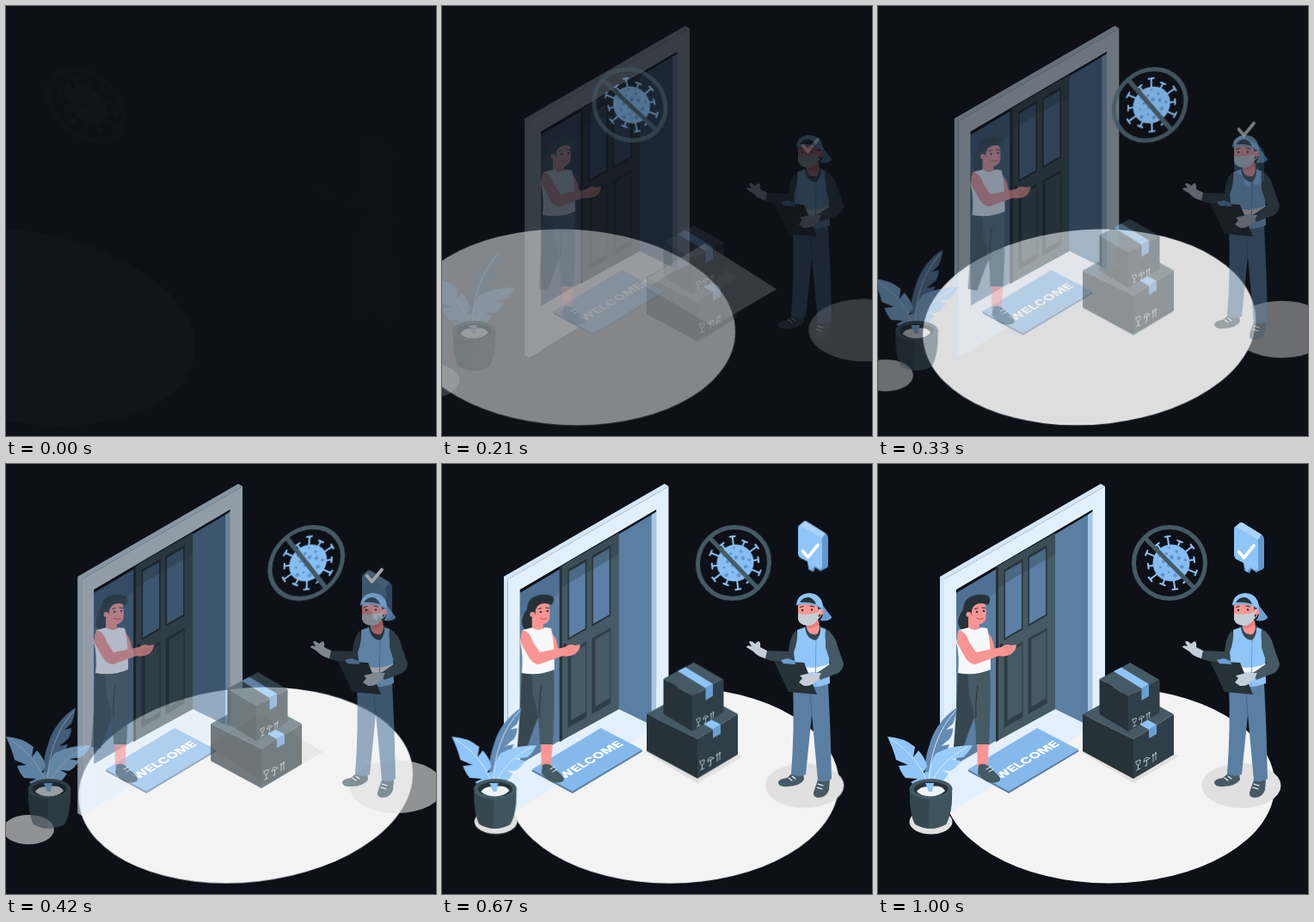
Recreate the animation shown at these times as an HTML page. Size 500 by 500 pixels, loop 1.04 s.

```html
<!DOCTYPE html>
<html lang="en">
<head>
<meta charset="utf-8">
<title>Contactless delivery</title>
<style>
  html, body { margin: 0; width: 100%; height: 100%; overflow: hidden; background: #0d1117; }
  svg { display: block; width: 100%; height: 100%; }
  .move { animation: 1s cubic-bezier(.36, -.01, .5, 1.38) both paused; }
  .sweep { animation-name: sweep; transform-box: fill-box; transform-origin: center; }
  .slide { animation-name: slide; }
  .shrink { animation-name: shrink; transform-origin: 252px 367px; }
  .fade { animation-name: fade; }
  @keyframes sweep {
    0% { transform: translateX(-250px) skewX(20deg); opacity: 0; }
    60% { transform: translateX(0) skewX(-10deg); opacity: 1; }
    80% { transform: translateX(0) skewX(2deg); opacity: 1; }
    100% { transform: translateX(0) skewX(0); opacity: 1; }
  }
  @keyframes slide {
    from { transform: translate(var(--dx, 0px), var(--dy, 0px)); opacity: 0; }
    to { transform: none; opacity: 1; }
  }
  @keyframes shrink { from { transform: scale(1.5); opacity: 0; } to { transform: none; opacity: 1; } }
  @keyframes fade { from { opacity: 0; } to { opacity: 1; } }

  .blue { fill: #8fc5f8; }
  .mid { fill: #5b7fa3; }
  .ink { fill: #263238; }
  .slate { fill: #37474f; }
  .steel { fill: #455a64; }
  .skin { fill: #f99593; }
  .white { fill: #fff; }
  .glove { fill: #c3ced8; }
  .line { fill: none; stroke-linecap: round; stroke-linejoin: round; }
  .mat { font: 800 15.5px Inter, Roboto, sans-serif; fill: #fff; text-anchor: middle; }
</style>
</head>
<body>
<svg viewBox="0 0 500 500">
  <ellipse class="move sweep" cx="268.5" cy="373.5" rx="193" ry="114" fill="#f3f3f3"/>

  <g class="move shrink" fill="#e0e0e0">
    <ellipse cx="61.5" cy="416" rx="25" ry="14.5"/>
    <ellipse cx="422.5" cy="374" rx="46" ry="26"/>
    <path d="M236 335 297 371 350 340 290 302Z"/>
  </g>

  <!-- doorway -->
  <g class="move slide" style="--dx:30px">
    <path fill="#e3effa" d="M91 335 206 284 250 306 91 400Z"/>
    <path class="mid" d="M91 150 249 56 249 306 206 285 137 322 91 349Z"/>
    <path fill="#4f7093" d="M91 150 137 123 137 150 91 177Z"/>
    <path class="steel" d="M137 120 206 80 206 285 137 323Z"/>
    <path class="ink" d="M137 120 140 118.500 140 321.500 137 323Z"/>
    <g id="panes"></g>
    <path fill="#263238" opacity=".3" d="M137 120 206 80 206 105 137 145Z"/>
    <circle class="ink" cx="143.500" cy="211" r="2.200"/>
    <path fill="#a6c6e4" d="M244 59 250 55 250 307 244 304Z"/>
    <path fill="#d3e6f8" d="M72 131 259 23 264 26 77 134 77 409 72 406Z"/>
    <path fill="#e2f0fd" fill-rule="evenodd" d="M77 134 264 26 264 300 249.500 308 249.500 53 91 146 91 401 77 409Z"/>
    <!-- mat -->
    <path class="mid" d="M105 355 152 380 233 332 233 334.500 152 383 105 357.500Z"/>
    <path fill="#85b9ec" d="M105 355 185 307 233 332 152 380.500Z"/>
    <text class="mat" transform="matrix(.86 -.505 .72 .43 177 346.500)">WELCOME</text>
  </g>

  <!-- resident -->
  <g class="move slide" style="--dx:30px">
    <path class="ink" d="M104 164Q93 174 93 184Q94 193 101 195Q109 188 112 174Z"/>
    <path class="skin" d="M126 195Q134 200 136 219L127 224 122 202Z"/>
    <path class="slate" d="M93 240 130 238Q129 275 111 297Q103 318 99 331L88 329Q91 292 92 262Z"/>
    <path class="skin" d="M115 323 129 323 127 353 116 353Z"/>
    <path class="steel" d="M104 240 130 238Q132 268 129 326L114 326Q114 292 106 269Z"/>
    <path class="line" stroke="#263238" stroke-width="1" d="M116 258Q113 275 114 294"/>
    <path class="steel" d="M117 350Q123 347 128 351L141 363Q144 369 138 370Q129 372 122 366L116 360Z"/>
    <path class="line" stroke="#fff" stroke-width="1" d="M126 355 131 352M129 358 134 355"/>
    <path fill="#f7f8fa" d="M94 193 106 190Q112 195 120 190L127 191Q131 205 131 239Q112 247 93 243Q95 222 91 207Z"/>
    <path class="skin" d="M105 179 118 182 118 191Q112 195 105 190Z"/>
    <path class="skin" d="M95 193Q103 196 106 207L114 219 143 213Q149 208 155 211L161 210Q161 216 155 221Q147 225 141 223L113 233Q107 233 102 226L92 208Q91 196 95 193Z"/>
    <path class="line" stroke="#e57f82" stroke-width=".8" d="M147 216 154 214M147 219 155 218"/>
    <path class="skin" d="M105 166Q114 158 124 161Q127 172 125 181Q121 188 114 186Q107 184 103 176Z"/>
    <path class="ink" d="M99 171Q99 156 111 153Q120 150 129 154Q132 158 128 164Q119 160 113 164Q108 168 109 175Q104 178 104 182Q98 178 99 171Z"/>
    <circle class="skin" cx="105.500" cy="175" r="3"/>
    <g class="ink"><circle cx="115" cy="172" r="1.200"/><circle cx="123" cy="171" r="1.200"/></g>
    <path class="line" stroke="#263238" stroke-width="1" d="M112.500 168.500 116 167.500M121 167 124.500 167.500"/>
    <path class="line" stroke="#b94e5c" stroke-width="1" d="M115 179.500Q118 182 122 179.500"/>
  </g>

  <!-- plant -->
  <g class="move slide" style="--dx:-30px">
    <path fill="#638bb4" d="M57 378Q51 350 60 326Q67 300 92 283Q91 293 87 302L79 309 87 307Q87 315 83 320L73 328 83 326Q80 335 75 340L66 348 74 345Q70 360 61 378Z"/>
    <path class="blue" d="M58 380Q47 378 38 370L46 366 32 365Q27 360 24 351L35 350 21 344Q18 332 11 317Q30 318 43 329L41 341 47 333Q56 343 57 352L52 359 58 358Q62 368 62 380Z"/>
    <path fill="#9accfa" d="M58 380Q56 353 67 337Q83 327 110 327Q105 336 99 341L84 343 96 345Q91 354 84 357L74 356 82 360Q76 370 62 380Z"/>
    <path class="line" stroke="#dceefe" stroke-width=".9" d="M59 376Q49 341 15 320M61 376Q69 347 104 329M59 374Q60 320 90 287"/>
    <path class="slate" d="M37 378Q36 406 43 419Q61 429 79 419Q87 405 86 378Z"/>
    <path class="steel" d="M60 388 86 380Q87 405 79 419Q70 424 59 424Z" opacity=".7"/>
    <ellipse class="steel" cx="61.500" cy="378" rx="25" ry="12"/>
    <ellipse class="ink" cx="61.500" cy="378" rx="20" ry="8.500"/>
    <path fill="#eef3f7" d="M45 381Q49 374 61 375Q74 373 78 380Q72 386 61 386.500Q50 386 45 381Z"/>
    <path class="blue" d="M55 371 65 371 63 381 59 381Z"/>
  </g>

  <!-- sign -->
  <g class="move sweep">
    <g id="virus" transform="translate(341 115)"></g>
    <g fill="none" stroke="#455a64" stroke-width="5">
      <circle cx="339" cy="115" r="41.500"/>
      <path d="M310 85.500 368 144.500"/>
    </g>
  </g>

  <!-- parcels -->
  <g class="move slide" style="--dy:30px">
    <path class="steel" d="M238 291 291 262 344 291 297 320Z"/>
    <path class="ink" d="M238 291 297 320 297 366 238 334Z"/>
    <path fill="#303f47" d="M297 320 344 291 344 338 297 366Z"/>
    <path class="blue" d="M303 302 312 297 324 303 315 309Z"/>
    <path fill="#6a9fd4" d="M315 309 324 303 324 314 315 319Z"/>
    <path class="steel" d="M257.500 250 293 231 327.500 251 291 270Z"/>
    <path class="ink" d="M257.500 250 291 270 291 311 257.500 291Z"/>
    <path fill="#303f47" d="M291 270 327.500 251 327.500 289 291 311Z"/>
    <path class="blue" d="M274 241 283 236.500 315 256 306.500 261Z"/>
    <path fill="#6a9fd4" d="M306.500 261 315 256 315 270 306.500 275Z"/>
    <g class="line" stroke="#d5dde2" stroke-width=".8">
      <path id="care" d="M300 346 305 344Q305 350 302.500 350Q300 351 300 346M302.500 350V355M300.500 356 305 354M309 346Q310 339 316 342ZM312.500 344V350Q312 353 310.500 351M320 337.500V346M323 335.500V344M319 339.500 320 337.500 321 338.500M322 337.500 323 335.500 324 336.500"/>
      <path transform="translate(41 -3) scale(.85)" d="M300 353 305 351Q305 357 302.500 357Q300 358 300 353M302.500 357V362M300.500 363 305 361M309 353Q310 346 316 349ZM312.500 351V357Q312 360 310.500 358M320 345V353M323 343V351M319 347 320 345 321 346M322 345 323 343 324 344"/>
    </g>
  </g>

  <!-- bubble -->
  <g class="move slide" style="--dy:75px">
    <g class="move slide" style="--dy:75px">
      <path fill="#6398cf" d="M420 69Q422 67 425 69L446 82Q449 84 449 88V119Q449 122 446 123L440 126 434 122 432 127 426 124Z"/>
      <path fill="#abd4fb" d="M414 74 420 69Q422 67 425 69L446 82 441 89Z"/>
      <path class="blue" d="M414 76Q414 72 418 74L439 86Q442 88 442 92V121Q442 125 438 123L433 120 429 126 425 115 417 111Q414 109 414 105Z"/>
    </g>
    <path class="line" stroke="#fff" stroke-width="3.600" d="M419.500 102 425.500 109 437 95"/>
  </g>

  <!-- courier -->
  <g class="move fade">
    <path class="steel" d="M408 359 420 359 421 367Q417 374 402 375Q391 376 391 370Q392 366 401 365Z"/>
    <path class="steel" d="M437 367 451 367 450 379Q447 388 437 388Q431 387 432 382Z"/>
    <path class="line" stroke="#fff" stroke-width="1.100" d="M403 365 407 368M407 363 411 366M436 376 442 378M437 372 443 374"/>
    <path class="mid" d="M408 256 449 254Q452 310 453 366Q446 371 437 368L430 291 423 361Q414 365 406 360Q410 310 408 256Z"/>
    <path class="line" stroke="#466685" stroke-width="1" d="M430 291 428 267"/>
    <path class="slate" d="M412 194Q405 198 403 218L375 217 374 226 404 235Q413 235 417 222Z"/>
    <path class="slate" d="M413 193 424 188 440 188 452 195 450 252 411 252Z"/>
    <path class="blue" d="M413 193 422 190Q424 204 435 205Q441 199 440 190L446 192Q444 207 450 218L451 255Q432 263 409 256Q412 238 409 219Q414 206 413 193Z"/>
    <path fill="#f4f7fa" d="M410 233Q432 241 450.500 232L451 238Q431 246 410 240Z"/>
    <path class="line" stroke="#6a9fd4" stroke-width="1" d="M435 205 434 258"/>
    <path class="skin" d="M424 183 438 180 439 191Q437 200 432 198Q425 197 424 190Z"/>
    <path fill="#e67f81" d="M425 188 437 183 438 187Q431 192 425 191Z"/>
    <path class="ink" d="M386 229 421 231 436 268 403 265Z"/>
    <path fill="#6a9fd4" d="M394 228 402 226 410 229 411 233 397 232Z"/>
    <path class="steel" d="M446 193Q457 197 460 212L467 232Q467 238 461 243L440 251 436 243 452 232 446 213Z"/>
    <path class="glove" d="M441 243 437 251Q430 259 421 258L415 254 419 249 416 246 428 243Z"/>
    <path class="glove" d="M378 217 376 226Q367 224 362 218L354 213Q354 210 360 212L357 207Q359 204 364 209L368 206Q371 207 370 213Z"/>
    <path class="skin" d="M414 164Q427 157 441 164L440 178Q434 188 424 187Q415 184 414 174Z"/>
    <path class="ink" d="M436 162 443 163 441 181 437 183 438 172Z"/>
    <circle class="skin" cx="440" cy="172" r="3.600"/>
    <path fill="#c6cfd6" d="M414 174Q424 176 437 173L438 178Q434 188 425 188Q416 187 414 181Z"/>
    <path class="line" stroke="#dfe5ea" stroke-width="1" d="M437 174 441 169M437 180 441 176"/>
    <g class="ink"><circle cx="419" cy="170" r="1.200"/><circle cx="430" cy="169.500" r="1.200"/></g>
    <path class="line" stroke="#263238" stroke-width="1.200" d="M416.500 166.500 420 165.500M428 165 432.500 166"/>
    <path class="blue" d="M412 164Q413 151 427 150Q441 151 443 165L453 178Q452 183 440 182Q444 176 443 170Q435 163 426 163Q417 163 412 164Z"/>
    <path fill="#6a9fd4" d="M443 165 453 178Q452 183 440 182Q445 177 443 170Z"/>
    <path class="ink" d="M416 161Q420 154 427 155Q433 157 435 163Q425 160 416 161Z"/>
    <path class="line" stroke="#6a9fd4" stroke-width="1" d="M412 164Q427 159 443 168"/>
  </g>
</svg>
<script>
  const get = id => document.getElementById(id);

  // A door panel seen at an angle: left edge x, y and size
  const pane = (x, y, w, h, fill) =>
    `<path fill="${fill}" d="M${x} ${y}l${w} ${-w * .58}v${h}l${-w} ${w * .58}z"/>`;
  let panes = '';
  for (const [x, top, low] of [[148, 123, 219], [176, 107, 203]]) {
    panes += pane(x - 1.5, top, 22, 82, '#263238') + pane(x, top + 2, 19, 77, '#5b7fa6');
    panes += pane(x - 1.5, low, 22, 88, '#2f3e46') + pane(x + 2.5, low + 1, 17, 78, '#455a64');
  }
  get('panes').innerHTML = panes;

  let virus = '';
  for (let i = 0; i < 12; i++) {
    const reach = i % 2 ? 27 : 31;
    virus += `<path transform="rotate(${i * 30 - 8})" stroke="#8fc5f8" stroke-width="2"
      stroke-linecap="round" fill="none" d="M0 -19V${-reach}M-3 ${-reach}H3"/>`;
  }
  virus += '<circle r="21.5" fill="#86bdf2"/>';
  for (let i = 0; i < 16; i++) {
    const r = 4.6 * Math.sqrt(i), a = i * 2.4;
    virus += `<circle cx="${r * Math.cos(a)}" cy="${r * Math.sin(a)}" r="${1.3 + i % 3 * .5}" fill="#5f94c9"/>`;
  }
  get('virus').innerHTML = virus;

  // 24 poses per loop, the first one held longer
  const LOOP = 1040, STEP = 125 / 3;
  const moves = document.getAnimations();
  moves.forEach(m => m.pause());
  function draw() {
    const t = Math.floor(performance.now() % LOOP / 10) * 10;
    const pose = Math.max(0, Math.floor((t - 38) / STEP));
    const at = pose ? 68 + pose * STEP : 42;
    moves.forEach(m => { m.currentTime = at; });
    requestAnimationFrame(draw);
  }
  draw();
</script>
</body>
</html>
```
